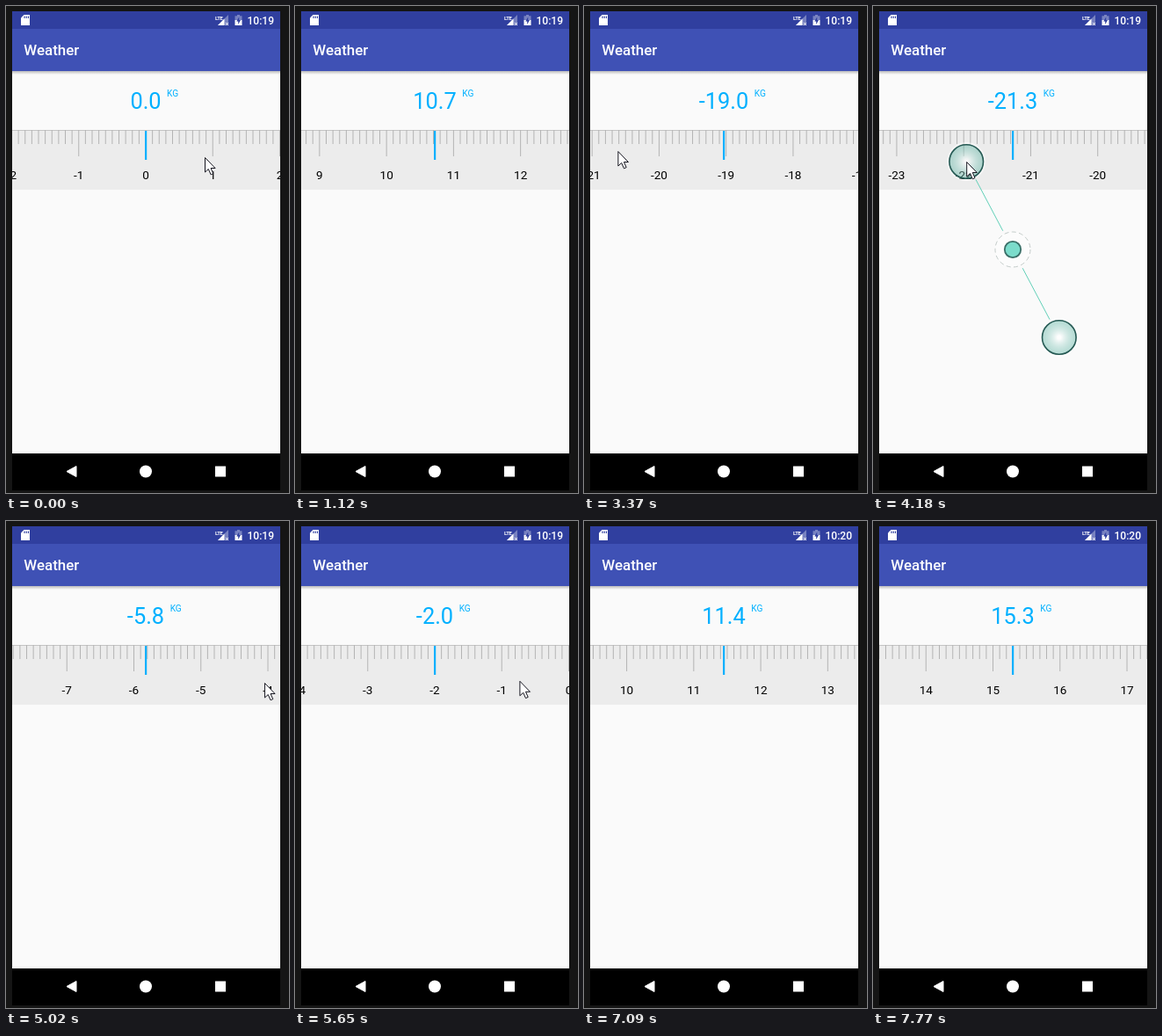
Animation, 322 px wide and 554 px high, one loop 9.12 s. Source, as an HTML page with a canvas:

```html
<!DOCTYPE html>
<html lang="en">
<head>
<meta charset="utf-8">
<title>Ruler picker</title>
<style>
html, body { margin: 0; width: 100%; height: 100%; overflow: hidden; background: #151515; }
canvas { display: block; width: 322px; height: 554px; }
</style>
</head>
<body>
<canvas id="stage"></canvas>
<script>
const W = 322, H = 554, LOOP = 9120;
const LEFT = 7, WIDTH = 305, MID = 159, UNIT = 76.25;
const LAG = 25; // delay between letting go and the fling
const ACCENT = '#00b0ff';
const canvas = document.getElementById('stage');
const ctx = canvas.getContext('2d');
const dpr = window.devicePixelRatio || 1;
canvas.width = W * dpr;
canvas.height = H * dpr;

// Each swipe drags the ruler with the finger, then flings it to rest
const swipes = [
  { press: 430, release: 630, from: 297, to: 18, y: 206, rest: 15.55, settle: 1940, leaves: true },
  { press: 2000, release: 2175, from: 71, to: 297, y: 178, rest: -23.6, settle: 4016 },
  { press: 4020, release: 4250, from: 284, to: 30, y: 177, rest: -2, settle: 5650 },
  { press: 6200, release: 6455, from: 278, to: 18, y: 208, rest: 15.295, settle: 7770, leaves: true }
];

// Where the pointer hovers between swipes
const hovers = [
  { t: 0, x: 226, y: 172 },
  { t: 80, x: 226, y: 172 },
  { t: 3370, x: 38, y: 165 },
  { t: 5020, x: 294, y: 184 },
  { t: 5870, x: 242, y: 181 },
  { t: 6080, x: 242, y: 181 }
];

const path = [
  ...hovers,
  ...swipes.flatMap(s => [
    { t: s.press, x: s.from, y: s.y },
    { t: s.release, x: s.to, y: s.y, gone: s.leaves }
  ])
].sort((a, b) => a.t - b.t);

const clamp = p => Math.max(0, Math.min(1, p));
const mix = (a, b, p) => a + (b - a) * p;
const progress = (t, a, b) => clamp((t - a) / (b - a));
const easeOut = p => 1 - (1 - p) ** 2;

function valueAt(t) {
  let v = 0;
  for (const s of swipes) {
    if (t < s.press) break;
    v -= (s.to - s.from) / UNIT * progress(t, s.press, s.release);
    v = mix(v, s.rest, easeOut(progress(t, s.release + LAG, s.settle)));
  }
  return v;
}

function pointerAt(t) {
  const i = path.findIndex(k => k.t > t);
  if (i < 1 || path[i - 1].gone) return null;
  const a = path[i - 1], b = path[i], p = progress(t, a.t, b.t);
  return [mix(a.x, b.x, p), mix(a.y, b.y, p)];
}

function rect(x, y, w, h, color) {
  ctx.fillStyle = color;
  ctx.fillRect(x, y, w, h);
}

function paint(fill, stroke, width = 1) {
  if (fill) { ctx.fillStyle = fill; ctx.fill(); }
  if (stroke) { ctx.strokeStyle = stroke; ctx.lineWidth = width; ctx.stroke(); }
}

function shape(d, x, y, fill, stroke) {
  ctx.save();
  ctx.translate(x, y);
  const p = new Path2D(d);
  if (fill) { ctx.fillStyle = fill; ctx.fill(p); }
  if (stroke) { ctx.strokeStyle = stroke; ctx.lineWidth = 1; ctx.stroke(p); }
  ctx.restore();
}

function circle(x, y, r, fill, stroke, width) {
  ctx.beginPath();
  ctx.arc(x, y, r, 0, Math.PI * 2);
  paint(fill, stroke, width);
}

function line(x0, y0, x1, y1, color) {
  ctx.beginPath();
  ctx.moveTo(x0, y0);
  ctx.lineTo(x1, y1);
  paint(null, color);
}

function text(str, x, y, size, color, align = 'left', weight = 400) {
  ctx.font = `${weight} ${size}px Roboto, sans-serif`;
  ctx.textAlign = align;
  ctx.fillStyle = color;
  ctx.fillText(str, x, y);
}

function drawStatus(t) {
  const bar = '#303f9f', faint = 'rgba(255,255,255,.35)';
  rect(LEFT, 6, WIDTH, 20, bar);

  shape('M3.5 0H10V12H0V3.5Z', 17, 10, '#fff');
  for (let i = 0; i < 3; i++) rect(20.5 + i * 2.2, 11.5, 1.1, 2.5, bar);

  shape('M12 0V12H0Z', 241, 10, faint);
  shape('M7.5 4.5V12H0Z', 241, 10, '#fff');
  line(250, 19, 253, 22, '#fff');
  line(253, 19, 250, 22, '#fff');
  ctx.letterSpacing = '-0.4px';
  text('LTE', 238, 15.6, 6, '#fff', 'left', 700);
  ctx.letterSpacing = '0px';

  rect(263, 10, 3, 1.5, faint);
  rect(260.5, 11.3, 8, 5, faint);
  rect(260.5, 16, 8, 6, '#fff');
  shape('M3 0L0 5H2V8.5L4.8 3.5H3Z', 262.2, 12.5, bar);
  text(t < 6700 ? '10:19' : '10:20', 305, 20.6, 12, '#fff', 'right', 500);
}

function drawChrome(t) {
  rect(0, 0, W, H, '#151515');
  rect(LEFT, 74, WIDTH, 435, '#fafafa');
  const shade = ctx.createLinearGradient(0, 74, 0, 78);
  shade.addColorStop(0, 'rgba(0,0,0,.25)');
  shade.addColorStop(1, 'rgba(0,0,0,0)');
  rect(LEFT, 74, WIDTH, 4, shade);
  rect(LEFT, 26, WIDTH, 48, '#3f51b5');
  text('Weather', 20.3, 56, 16.94, '#fff', 'left', 500);
  drawStatus(t);

  rect(LEFT, 509, WIDTH, 42, '#000');
  ctx.lineJoin = 'round';
  shape('M0 6L11 0V12Z', 69, 523.5, '#fff', '#fff');
  circle(MID, 529.5, 7, '#fff');
  rect(238, 523.5, 12, 12, '#fff');
}

function drawRuler(v) {
  ctx.save();
  ctx.beginPath();
  ctx.rect(LEFT, 95, WIDTH, 120);
  ctx.clip();
  rect(LEFT, 141, WIDTH, 68, '#ececec');
  rect(LEFT, 141, WIDTH, 1, '#c4c4c4');
  for (let i = Math.floor((v - 2.4) * 10); i <= (v + 2.4) * 10; i++) {
    const x = MID + (i / 10 - v) * UNIT;
    const major = i % 10 === 0;
    rect(x - .5, 141, 1, major ? 30 : 16, '#b4b4b4');
    if (major) text(String(i / 10), x, 197, 13.55, '#000', 'center');
  }
  rect(MID - 1, 142, 2.2, 33, ACCENT);

  const label = v.toFixed(1).replace('-0.0', '0.0');
  text(label, MID, 116.5, 25.4, ACCENT, 'center');
  const half = ctx.measureText(label).width / 2;
  text('KG', MID + half + 6.5, 102.5, 10.16, ACCENT);
  ctx.restore();
}

// Two mirrored fingers around a dashed centre
function drawTouch(x, y) {
  const cx = MID, cy = 277;
  const dx = x - cx, dy = y - cy, len = Math.hypot(dx, dy);
  for (const side of [-1, 1]) {
    const px = cx + side * dx, py = cy + side * dy;
    const ux = side * dx / len, uy = side * dy / len;
    line(cx + ux * 24, cy + uy * 24, px - ux * 23, py - uy * 23, '#62d0b8');
    const glow = ctx.createRadialGradient(px, py, 2, px, py, 19.5);
    glow.addColorStop(0, 'rgba(255,255,255,.6)');
    glow.addColorStop(1, 'rgba(60,165,145,.36)');
    circle(px, py, 21, null, 'rgba(255,255,255,.5)', 2);
    circle(px, py, 19.3, glow, '#265a54', 1.6);
  }
  ctx.setLineDash([5, 3.4]);
  circle(cx, cy, 20, 'rgba(255,255,255,.5)', '#c3cbc9', 1);
  ctx.setLineDash([]);
  circle(cx, cy, 9.2, '#7bdccb', '#3a6f68', 1.8);
}

function drawPointer(x, y) {
  ctx.lineJoin = 'miter';
  shape('M0 0V16.5L3.8 13L6.6 19.3L9.3 18.1L6.6 12H11.6Z', x + .5, y + .5, '#fff', '#15151f');
}

function frame(t) {
  ctx.setTransform(dpr, 0, 0, dpr, 0, 0);
  drawChrome(t);
  drawRuler(valueAt(t));
  const pos = pointerAt(t);
  if (!pos) return;
  if (swipes.some(s => t >= s.press && t < s.release + LAG)) drawTouch(...pos);
  drawPointer(...pos);
}

const start = performance.now();
function loop() {
  frame((performance.now() - start) % LOOP);
  requestAnimationFrame(loop);
}
loop();
</script>
</body>
</html>
```
